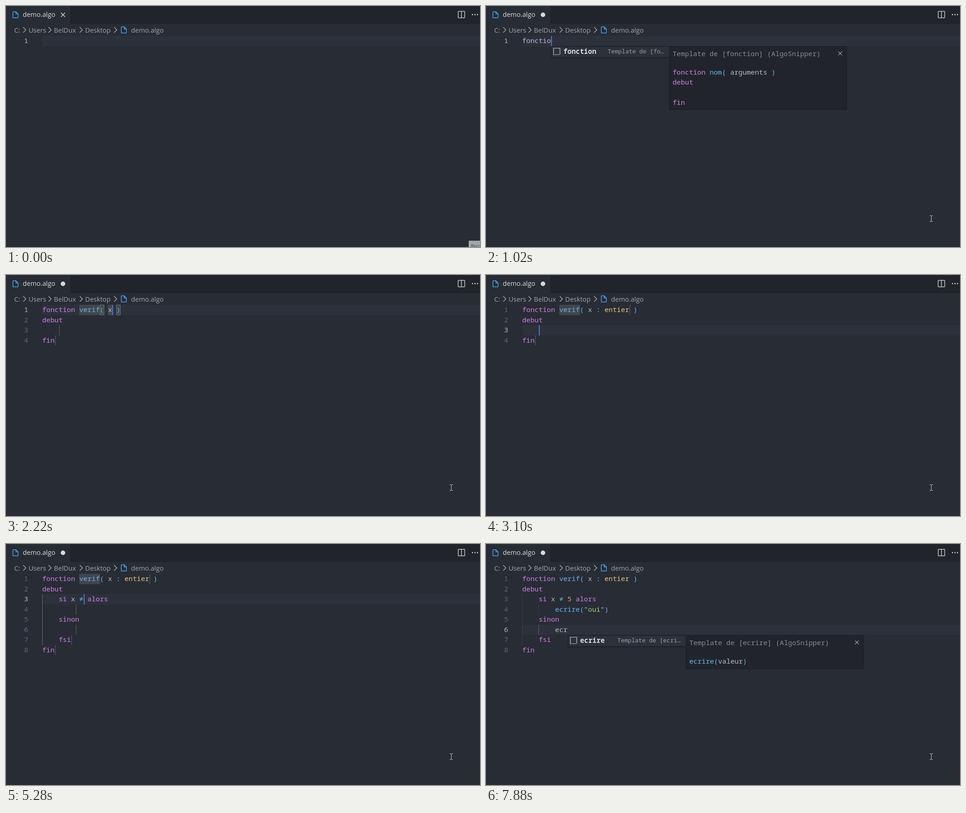
An HTML page that plays this animation: 1048 px wide and 534 px high, repeating every 8000 ms.

```html
<!DOCTYPE html>
<html lang="fr">
<head>
<meta charset="utf-8">
<title>demo.algo</title>
<style>
  html, body { margin: 0; width: 100%; height: 100%; overflow: hidden; background: #282c34; }
  svg { display: block; position: absolute; left: 0; top: 0; }
  .ui { font: 14.6px "Open Sans", "Noto Sans", sans-serif; }
  .code { font: 500 15.167px "Noto Sans Mono", "DejaVu Sans Mono", monospace; }
  .small { font-size: 12.97px; }
  .line { fill: none; stroke-width: 1.5; }
  .thin { stroke-width: 1.2; }
</style>
</head>
<body>
<svg width="1048" height="534" viewBox="0 0 1048 534">
  <defs>
    <path id="file" class="line" stroke="#42a5f5" d="M7.5 .8H1.8Q.8 .8 .8 1.8V13.2Q.8 14.2 1.8 14.2H11.2Q12.2 14.2 12.2 13.2V5.5L7.5 .8V5.5H12.2"/>
    <path id="chev" class="line" stroke="#a0a5ae" d="M0 0L6 6L0 12"/>
    <path id="shut" class="line" stroke="#d7dae0" d="M-4.5 -4.5L4.5 4.5M4.5 -4.5L-4.5 4.5"/>
    <path id="shutThin" class="line thin" stroke="#abb0b8" d="M-4.2 -4.2L4.2 4.2M4.2 -4.2L-4.2 4.2"/>
  </defs>
  <rect width="1048" height="40" fill="#21252b"/>
  <rect width="143" height="40" fill="#282c34"/>
  <rect x="143" width="1" height="40" fill="#1b1e23"/>
  <use href="#file" x="14.5" y="12"/>
  <use href="#file" x="254" y="45.5"/>
  <use href="#chev" x="38" y="47"/>
  <use href="#chev" x="94" y="47"/>
  <use href="#chev" x="163" y="47"/>
  <use href="#chev" x="239" y="47"/>
  <g class="ui" fill="#a0a5ae">
    <text x="37" y="24" fill="#d7dae0">demo.algo</text>
    <text x="18" y="59">C:</text>
    <text x="50" y="59">Users</text>
    <text x="106" y="59">BelDux</text>
    <text x="175" y="59">Desktop</text>
    <text x="276.5" y="59">demo.algo</text>
  </g>
  <path class="line" stroke="#c5c5c5" d="M1000.7 11.7H1013.3Q1014.3 11.7 1014.3 12.7V25.3Q1014.3 26.3 1013.3 26.3H1000.7Q999.7 26.3 999.7 25.3V12.7Q999.7 11.7 1000.7 11.7ZM1007 12V26"/>
  <g fill="#c5c5c5"><circle cx="1031.5" cy="19" r="1.5"/><circle cx="1037" cy="19" r="1.5"/><circle cx="1042.5" cy="19" r="1.5"/></g>
  <g id="view" class="code"></g>
</svg>
<script>
const LOOP = 8000, CW = 9.1, LH = 22.5, X0 = 80, Y0 = 66;

// ---- Timeline ----
const steps = [];
let now = { lines: [''], cur: [0, 0], sel: null, marks: [], pop: null, dirty: false, tip: true, caret: false };
const at = (t, patch) => { now = { ...now, ...patch }; steps.push({ t, ...now }); };
const type = (times, make) => times.forEach((t, i) => at(t, make(i + 1)));
const list = (...rows) => ({ rows });
const help = (...rows) => ({ rows, doc: true });
const withLine = (i, text) => now.lines.map((l, k) => k === i ? text : l);

const docs = {
  fonction: ['fonction nom( arguments )', 'debut', '', 'fin'],
  sinon: ['si condition alors', '', 'sinon', '', 'fsi'],
  entier: ['entier'],
  ecrire: ['ecrire(valeur)'],
  '!=': ['≠']
};
const all = ['!=', 'fonction', 'procedure', 'si', 'sinon', 'pour', 'tantque', 'repeter', 'selon', 'ecrire', 'lire', 'entier'];

const signature = (name, arg) => {
  const a = 11 + name.length;
  return {
    lines: [`fonction ${name}( ${arg} )`, 'debut', '', 'fin'],
    marks: [[0, 9, a - 2], [0, a, a + arg.length], [2, 4, 4], [3, 3, 3]],
    sel: null
  };
};

at(0, {});
at(60, { tip: false, caret: true });
type([240, 360, 480, 540, 660, 780, 900, 1140], n => ({
  lines: ['fonction'.slice(0, n)], cur: [0, n], dirty: true,
  pop: n > 1 ? help('fonction') : null
}));
at(1260, { ...signature('nom', 'arguments'), cur: [0, 12], sel: [0, 9, 12], pop: null });
type([1440, 1500, 1620, 1680, 1740], n => ({ ...signature('verif'.slice(0, n), 'arguments'), cur: [0, 9 + n] }));
at(1860, { cur: [0, 25], sel: [0, 16, 25] });
type([2100, 2280, 2340, 2400, 2460], n => ({ ...signature('verif', 'x : e'.slice(0, n)), cur: [0, 16 + n] }));
at(2520, { pop: list('entier', 'ecrire') });
at(2590, { pop: { ...help('entier', 'ecrire'), h: 135 } });
at(2650, { pop: help('entier', 'ecrire') });

const head = [[0, 9, 14], [0, 26, 26]];
at(2890, { ...signature('verif', 'x : entier'), marks: [...head, [2, 4, 4], [3, 3, 3]], cur: [0, 26], pop: null });
at(3070, { cur: [2, 4] });
type([3230, 3410, 3530, 3650], n => ({
  lines: withLine(2, '    ' + 'sino'.slice(0, n)), cur: [2, 4 + n],
  marks: [...head, [2, 4, 4 + n], [3, 3, 3]],
  pop: n < 2 ? list('sinon', 'si') : n < 3 ? help('sinon', 'si') : help('sinon')
}));

const tail = [[5, 8, 8], [6, 7, 7], [7, 3, 3]];
const test = (cond, ...own) => ({
  lines: [now.lines[0], 'debut', `    si ${cond} alors`, '', '    sinon', '', '    fsi', 'fin'],
  cur: [2, 7 + cond.length], sel: null, marks: [...head, ...own, [3, 8, 8], ...tail], pop: null
});
at(3890, { ...test('condition', [2, 7, 16]), sel: [2, 7, 16] });
at(4310, test('x', [2, 7, 8]));
at(4430, test('x ', [2, 7, 9]));
at(4610, { ...test('x !', [2, 7, 10]), pop: list(...all) });
at(4730, { ...test('x !=', [2, 7, 11]), pop: help(...all) });
at(5160, test('x ≠'));
at(5340, test('x ≠ ', [2, 10, 11]));
at(5460, test('x ≠ 5', [2, 10, 12]));
at(5640, { cur: [3, 8] });

const five = [2, 10, 12];
const write = (text, n, ...own) => ({
  lines: withLine(3, '        ' + text), cur: [3, n], sel: null, marks: [...head, five, ...own, ...tail], pop: null
});
at(5760, write('e', 9, [3, 8, 9]));
at(5820, { pop: list('entier', 'ecrire') });
at(5880, { pop: { ...help('entier', 'ecrire'), h: 135 } });
type([5950, 6010, 6130, 6310], n => ({
  ...write('ecrire'.slice(0, n + 1), 9 + n, [3, 8, 9 + n]), pop: help('ecrire')
}));
at(6490, { ...write('ecrire(valeur)', 21, [3, 15, 21], [3, 22, 22]), sel: [3, 15, 21] });
type([6790, 6850, 6970, 7030], n => write(`ecrire("${'oui'.slice(0, n - 1)}")`, 15 + n, [3, 15, 16 + n], [3, 17 + n, 17 + n]));
at(7150, { cur: [3, 21] });
at(7270, { cur: [5, 8], marks: [] });
at(7400, { lines: withLine(5, '        e'), cur: [5, 9] });
at(7460, { pop: list('entier', 'ecrire') });
at(7520, { pop: { ...help('entier', 'ecrire'), h: 135 } });
type([7580, 7760], n => ({ lines: withLine(5, '        ' + 'ecr'.slice(0, n + 1)), cur: [5, 9 + n], pop: help('ecrire') }));
at(7880, { caret: false });

// ---- Drawing ----
const rect = (x, y, w, h, fill, more = '') => `<rect x="${x}" y="${y}" width="${w}" height="${h}" fill="${fill}" ${more}/>`;
const text = (x, y, s, fill, more = '') => `<text x="${x}" y="${y}" fill="${fill}" ${more}>${s}</text>`;
const colX = c => X0 + c * CW;
const caretX = c => Math.round(colX(c) + .7);
const rowY = i => Math.round(Y0 + i * LH);

function hue(tok, next) {
  if (tok[0] === '"') return '#9dca7e';
  if (/^\d+$/.test(tok)) return '#d9a06c';
  if (/^(≠|!=|!)$/.test(tok)) return '#5abecb';
  if (/^[()]$/.test(tok) || next === '(') return '#65b5f6';
  if (/^(fonction|debut|fin|si|sinon|alors|fsi)$/.test(tok)) return '#d07ee7';
  return tok === 'entier' ? '#edc180' : '#b4bac7';
}

const code = (s, x, y) => [...s.matchAll(/"[^"]*"?|\w+|!=|\S/g)]
  .map(m => text(x + m.index * CW, y, m[0], hue(m[0], s[m.index + m[0].length]))).join('');

function guides(s) {
  const depth = l => l.search(/\S/) / 4;
  const level = s.lines.map((l, i) => {
    if (l.trim()) return depth(l);
    const prev = s.lines.slice(0, i).reverse().find(k => k.trim());
    const next = s.lines.slice(i + 1).find(k => k.trim());
    return prev && next ? Math.min(depth(prev), depth(next)) : 0;
  });
  const row = s.cur[0], lit = level[row];
  let from = row, to = row;
  while (level[from - 1] >= lit) from--;
  while (level[to + 1] >= lit) to++;
  let out = '';
  level.forEach((n, i) => {
    for (let k = 0; k < n; k++) {
      const on = !s.sel && k === lit - 1 && i >= from && i <= to;
      out += rect(Math.round(colX(4 * k)), rowY(i), 1, rowY(i + 1) - rowY(i), on ? '#666b75' : '#3b4048');
    }
  });
  return out;
}

function brackets(s) {
  const [row, col] = s.cur, l = s.lines[row];
  const open = col ? l.lastIndexOf('(', col - 1) : -1, close = l.indexOf(')', col);
  if (s.sel || s.lines.length < 2 || open < 0 || close < 0) return '';
  return [open, close].map(c => rect(Math.ceil(colX(c)) + .5, rowY(row) + .5, 8, 22, '#3b414d', 'stroke="#7d8077"')).join('');
}

function popup({ rows, doc, h }, [row, col]) {
  const x = caretX(col), y = Math.round(Y0 + .5 + (row + 1) * LH);
  let out = rect(x + .5, y + .5, 261, rows.length * LH + 3, '#21252b', 'stroke="#181a1f"');
  out += rect(x + 1, y + 1, 260, LH + 1, '#2c313a');
  rows.forEach((name, i) => {
    const ry = y + i * LH, max = Math.floor((199 - name.length * CW) / 7.78);
    let note = `Template de [${name}]`;
    if (note.length > max) note = note.slice(0, max - 1) + '…';
    out += `<path class="line thin" stroke="#c8ccd2" d="M${x + 5.5} ${ry + 18}V${ry + 4.5}H${x + 19.5}V${ry + 18}"/>`;
    out += `<path class="line" stroke="#c8ccd2" stroke-dasharray="2 1.6" d="M${x + 5} ${ry + 18.7}H${x + 20}"/>`;
    out += text(x + 27, ry + 17, name, i ? '#b4bac7' : '#d7dae0', i ? '' : 'font-weight="700"');
    out += text(x + 249.5, ry + 16, note, '#989ea8', 'class="small" text-anchor="end"');
  });
  if (!doc) return out;
  const body = docs[rows[0]], px = x + 268.5;
  out += rect(x + 261.5, y + .5, 392, (h || 53 + body.length * 22) - 1, '#21252b', 'stroke="#181a1f"');
  out += text(px, y + 21.5, `Template de [${rows[0]}] (AlgoSnipper)`, '#868b95');
  out += `<use href="#shutThin" x="${x + 639}" y="${y + 16}"/>`;
  body.forEach((l, i) => out += code(l, px, y + 63 + i * 22.2));
  return out;
}

function draw(s) {
  const [row, col] = s.cur;
  let out = s.dirty ? '<circle cx="126" cy="19.5" r="5" fill="#d7dae0"/>' : '<use href="#shut" x="126" y="19.5"/>';
  if (!s.sel) out += rect(80, rowY(row), 968, rowY(row + 1) - rowY(row), '#2c313c');
  out += guides(s);
  for (const [i, a, b] of s.marks) {
    const y = rowY(i), h = rowY(i + 1) - y;
    out += a === b ? rect(caretX(a), y, 2, h, '#45494f') : rect(colX(a), y, (b - a) * CW + .6, h, '#42464c');
  }
  if (s.sel) {
    const [i, a, b] = s.sel;
    out += rect(colX(a), rowY(i), (b - a) * CW, rowY(i + 1) - rowY(i), '#50555f');
  }
  out += brackets(s);
  s.lines.forEach((l, i) => {
    const y = Math.round(Y0 + i * LH + 16);
    out += text(49, y, i + 1, i === row ? '#b4bac7' : '#5f687c', 'text-anchor="end"') + code(l, X0, y);
  });
  if (s.caret) out += rect(caretX(col), rowY(row), 1.5, rowY(row + 1) - rowY(row), '#528bff');
  if (s.pop) out += popup(s.pop, s.cur);
  if (s.tip) {
    out += rect(1023, 520, 25, 14, '#a5a5a7') + text(1028, 535, 'Recording', '#33363b', 'class="ui" style="font-size:9.5px"');
  } else {
    out += '<path fill="none" stroke="#d8d8d8" d="M981 464.5H983.5L984.5 465.5L985.5 464.5H988M984.5 465V477M981 477.5H983.5L984.5 476.5L985.5 477.5H988"/>';
  }
  return out;
}

const view = document.getElementById('view'), start = performance.now();
let shown = null;
function tick() {
  const t = (performance.now() - start) % LOOP;
  const s = steps.findLast(k => k.t <= t) || steps[0];
  if (s !== shown) view.innerHTML = draw(shown = s);
  requestAnimationFrame(tick);
}
tick();
</script>
</body>
</html>
```
